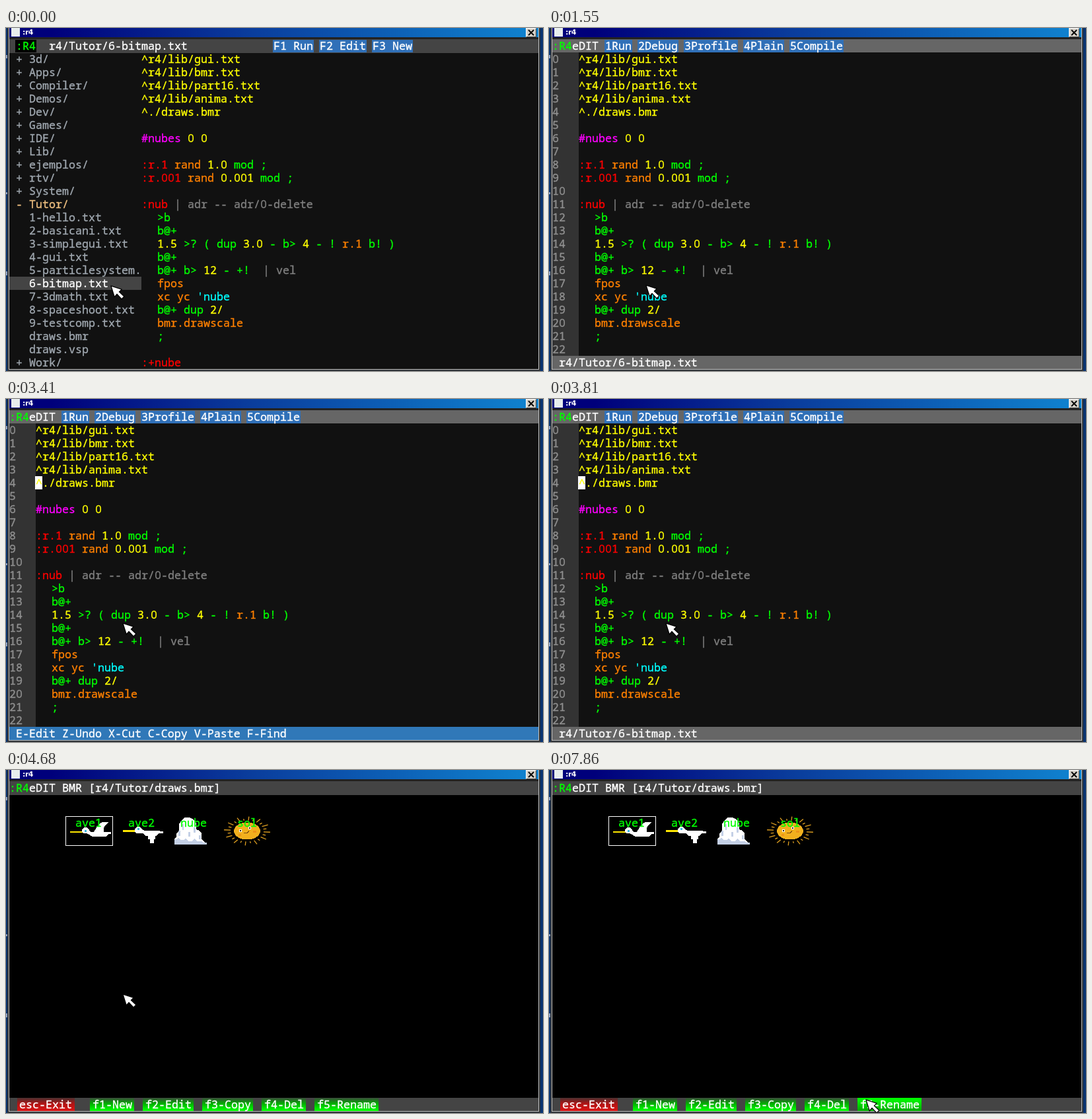
An HTML page that plays this animation: 813 by 520 pixels, repeating every 7.99 s.

```html
<!DOCTYPE html>
<html lang="en">
<head>
<meta charset="utf-8">
<title>:r4</title>
<style>
html, body { margin: 0; width: 100%; height: 100%; overflow: hidden; background: #0a3470; }
#stage { position: relative; width: 813px; height: 520px; overflow: hidden;
  font: 16.667px/20px "Noto Sans Mono", monospace; color: #fff; }
#stage div, #stage svg, #stage section { position: absolute; }
.t { white-space: pre; height: 20px; -webkit-text-stroke: .35px currentColor; }
.t i { display: inline-block; width: 10px; text-align: center; line-height: 0;
  font-family: "Open Sans", sans-serif; font-style: normal; }
section { left: 0; top: 0; width: 813px; height: 520px; }
#frame { left: 2px; top: 0; width: 807px; height: 520px; background: #303438; }
#edge { left: 4px; top: 0; width: 801px; height: 517px; border: solid #c0c0c0; border-width: 0 1px 1px; background: #222; }
#title { left: 5px; top: 0; width: 801px; height: 14px;
  background: linear-gradient(90deg, #00007b 8%, #0a3c9c 45%, #1084d0); }
#name { left: 25px; top: 0; font: bold 11px/14px "DejaVu Sans", sans-serif; letter-spacing: -.5px; }
#close { left: 787px; top: 0; width: 14px; height: 12px; background: #d4d0c8;
  border: 1px solid #404040; border-color: #fff #404040 #404040 #fff; }
.btn { top: 497px; height: 20px; background: linear-gradient(#3a4a3a, #00b000 45%, #0f0 95%); }
.btn.red { background: linear-gradient(#4a3030, #b01414 45%, #d81414 95%); }
.btn.hot { background: linear-gradient(#0f0 5%, #00a800); }
</style>
</head>
<body>
<div id="stage">
  <div id="frame"></div>
  <div id="edge"></div>
  <div id="title"></div>
  <div style="left:8px;top:0;width:13px;height:13px;background:#e8eeee"></div>
  <div id="name">:r4</div>
  <div id="close"><svg width="14" height="12"><path d="M3 2l8 8m0-8l-8 8" stroke="#000" stroke-width="1.8"/></svg></div>
  <section id="files"></section>
  <section id="edit"></section>
  <section id="bmr"></section>
  <svg id="mouse" width="24" height="24" viewBox="-2 -2 24 24" style="left:-2px;top:-2px">
    <path d="M0 0L14 4.5 10.5 8 18 15 15 18 8 10.5 4.5 14.5Z" fill="#fff" stroke="#000" stroke-width="2.4" paint-order="stroke"/>
  </svg>
</div>
<script>
const $ = id => document.getElementById(id);
const files = $('files'), edit = $('edit'), bmr = $('bmr'), mouse = $('mouse');

function add(parent, css, cls = '', html = '') {
  const el = document.createElement('div');
  el.className = cls;
  el.style.cssText = css;
  el.innerHTML = html;
  return parent.appendChild(el);
}
const box = (p, x, y, w, h, bg) => add(p, `left:${x}px;top:${y}px;width:${w}px;height:${h}px;background:${bg}`);
const zeros = s => s.replace(/0/g, '<i>0</i>');
const text = (p, x, y, s, color = '#fff') => add(p, `left:${x}px;top:${y}px;color:${color}`, 't', zeros(s));

// Row of labels on a shared background, one blank column apart
function tabs(p, x, labels) {
  for (const s of labels) {
    box(p, x - 1, 18, s.length * 10 + 2, 19, '#3070b8');
    text(p, x, 17, s);
    x += s.length * 10 + 10;
  }
}

const code = `^r4/lib/gui.txt
^r4/lib/bmr.txt
^r4/lib/part16.txt
^r4/lib/anima.txt
^./draws.bmr

#nubes 0 0

:r.1 rand 1.0 mod ;
:r.001 rand 0.001 mod ;

:nub | adr -- adr/0-delete
\t>b
\tb@+
\t1.5 >? ( dup 3.0 - b> 4 - ! r.1 b! )
\tb@+
\tb@+ b> 12 - +!  | vel
\tfpos
\txc yc 'nube
\tb@+ dup 2/
\tbmr.drawscale
\t;

:+nube`.split('\n');

const rules = [
  [/^\|/, 'gray'], [/^\^/, 'yellow'], [/^#/, 'magenta'], [/^:/, 'red'], [/^'/, 'cyan'],
  [/^\d[\d.]*\/?$/, 'yellow'], [/^(rand|fpos|xc|yc|r\.1|bmr\..*)$/, '#ff8000'], [/./, 'lime']
];
const paint = line => line.trim().replace(/\|.*|\S+/g, w =>
  `<span style="color:${rules.find(r => r[0].test(w))[1]}">${zeros(w)}</span>`);

function listing(p, x, lines) {
  lines.forEach((line, i) =>
    add(p, `left:${x + (line[0] === '\t' ? 24 : 0)}px;top:${37 + i * 20}px`, 't', paint(line)));
}

// File browser
box(files, 5, 17, 801, 500, '#111');
box(files, 5, 17, 801, 21, '#444');
box(files, 14, 18, 32, 19, '#000');
text(files, 15, 17, ':R4', 'lime');
text(files, 65, 17, 'r4/Tutor/6-bitmap.txt');
tabs(files, 405, ['F1 Run', 'F2 Edit', 'F3 New']);
box(files, 5, 377, 200, 20, '#444');
('+ 3d/,+ Apps/,+ Compiler/,+ Demos/,+ Dev/,+ Games/,+ IDE/,+ Lib/,+ ejemplos/,+ rtv/,+ System/,- Tutor/,' +
 '  1-hello.txt,  2-basicani.txt,  3-simplegui.txt,  4-gui.txt,  5-particlesystem.,  6-bitmap.txt,' +
 '  7-3dmath.txt,  8-spaceshoot.txt,  9-testcomp.txt,  draws.bmr,  draws.vsp,+ Work/').split(',')
  .forEach((s, i) => text(files, 15, 37 + i * 20, s, i === 11 ? '#f0c080' : i === 17 ? '#fff' : '#a0a8b0'));
listing(files, 205, code);

// Text editor
box(edit, 5, 17, 801, 500, '#111');
box(edit, 5, 37, 40, 460, '#333');
box(edit, 5, 17, 801, 20, '#666');
text(edit, 5, 17, ':R4', 'lime');
text(edit, 35, 17, 'eDIT');
tabs(edit, 85, ['1Run', '2Debug', '3Profile', '4Plain', '5Compile']);
for (let i = 0; i < 23; i++) text(edit, 5, 37 + i * 20, String(i), '#909090');
const caret = box(edit, 44, 117, 11, 20, '#fff');
listing(edit, 45, code.slice(0, 23));
const foot = box(edit, 5, 497, 801, 20, '#666');
const path = text(edit, 15, 497, 'r4/Tutor/6-bitmap.txt');
const keys = text(edit, 15, 497, 'E-Edit Z-Undo X-Cut C-Copy V-Paste F-Find');

// Sprite editor
box(bmr, 5, 17, 801, 500, '#000');
box(bmr, 5, 17, 801, 21, '#444');
text(bmr, 5, 17, ':R4', 'lime');
text(bmr, 35, 17, 'eDIT BMR [r4/Tutor/draws.bmr]');
box(bmr, 5, 497, 801, 20, '#444');

let rays = '';
for (let i = 0; i < 24; i++) {
  const a = i * Math.PI / 12 + .08, c = Math.cos(a), s = Math.sin(a), r = i % 2 ? .85 : 1;
  rays += `M${365 + 25 * c} ${92.5 + 16 * s}L${365 + 35 * r * c} ${92.5 + 22 * r * s}`;
}
add(bmr, 'left:0;top:0', '', `<svg width="420" height="130" style="left:0;top:0" shape-rendering="crispEdges">
  <rect x="90.5" y="70.5" width="71" height="44" fill="none" stroke="#fff"/>
  <path d="M97 93h20v2H97zM177 91h19v3h-19z" fill="#ffe800"/>
  <path d="M115 90l3-3h5l3 4 2 3h5l4-7 4-5 5-3h9l-4 4-3 5v6h11v3h-4l-3 4h-21l-5-3-4-2h-5l-2-2z" fill="#fff"/>
  <path d="M195 89l3-3h5l3 4 4 2h18l10 1v3h-7l-3 4h-2v5h-2v6h-6v-6h-3v-5h-4l-4-4h-9l-3-2z" fill="#fff"/>
  <path d="M119 91h3v3h-3zM199 88h3v3h-3z" fill="#38b8e0"/>
  <path d="M255 113v-9l3-3v-5l4-4v-10l4-6 4-4h8l6 3 4 6v9l5 2 3 4v8l4 5 4 2v2z" fill="#fff"/>
  <path d="M255 113v-8h4l2-3 3 4h5l3-3 4 5h6l3-4 4 4h7l2 2h6v3zM261 92h3v8h-3zM267 82h2v9h-2zM276 94h3v7h-3zM284 87h3v8h-3zM292 99h3v6h-3z" fill="#c4d0e6"/>
  <path d="${rays}" stroke="#e0a020" stroke-width="1.3" shape-rendering="auto"/>
  <ellipse cx="365" cy="92.5" rx="20" ry="13" fill="#f2b01e"/>
  <path d="M353 90h4v4h-4zM367 86h4v4h-4z" fill="#fff"/>
  <path d="M354 91h2v2h-2zM368 87h2v2h-2z" fill="#302010"/>
  <path d="M360 95q6 2 8-3" fill="none" stroke="#805010" stroke-width="1.2"/>
  <path d="M352 97h4v3h-4zM374 92h5v3h-5z" fill="#ee9418"/></svg>`);
[['ave1', 105], ['ave2', 185], ['nube', 264], ['sol', 350]].forEach(([s, x]) => text(bmr, x, 70, s, 'lime'));

const buttons = [['esc-Exit', 20], ['f1-New', 131], ['f2-Edit', 211], ['f3-Copy', 301], ['f4-Del', 391], ['f5-Rename', 471]]
  .map(([s, x], i) => {
    const l = x - (i ? 4 : 3), w = s.length * 10 + 7;
    const el = add(bmr, `left:${l}px;width:${w}px`, i ? 'btn' : 'btn red');
    text(bmr, x, 497, s);
    return { el, l, r: l + w };
  });

// Desktop crumbs at the left edge
[[41, 5], [249, 3], [369, 6]].forEach(([y, h]) => box($('stage'), 0, y, 2, h, '#8fa4c8'));

const LOOP = 7990;
const moves = [
  [0, 160, 392], [130, 154, 395], [270, 147, 395], [410, 144, 394],
  [720, 146, 393], [850, 150, 391], [990, 148, 391],
  [2110, 160, 368], [2260, 175, 345], [2540, 178, 341],
  [5240, 178, 339], [5390, 179, 338],
  [5820, 185, 346], [5970, 205, 370], [6130, 235, 398], [6280, 258, 417],
  [6560, 304, 451], [6700, 350, 478], [6840, 390, 495],
  [7440, 382, 491], [7580, 404, 495], [7720, 442, 499], [7860, 481, 501]
];
// Times at which each state flips, starting from off
const blinks = [1700, 2110, 2260, 2540, 2830, 3120, 3410, 3560, 3810, 4090, 4370, 4520];
const ctrl = [2690, 2980, 3270, 3810, 4520];
const isOn = (flips, t) => flips.filter(f => f <= t).length % 2 === 1;
const show = (el, on) => { el.style.visibility = on ? 'visible' : 'hidden'; };
const display = (el, on) => { el.style.display = on ? 'block' : 'none'; };

function draw(t) {
  display(files, t < 1550);
  display(edit, t >= 1550 && t < 4680);
  display(bmr, t >= 4680);

  const [, x, y] = moves.filter(m => m[0] <= t).pop();
  mouse.style.transform = `translate(${x}px,${y}px)`;
  for (const b of buttons) b.el.classList.toggle('hot', y >= 497 && x >= b.l && x < b.r);

  show(caret, isOn(blinks, t));
  const held = isOn(ctrl, t);
  foot.style.background = held ? '#3078b8' : '#666';
  show(keys, held);
  show(path, !held);
}

const start = performance.now();
function tick() {
  draw((performance.now() - start) % LOOP);
  requestAnimationFrame(tick);
}
draw(0);
requestAnimationFrame(tick);
</script>
</body>
</html>
```
